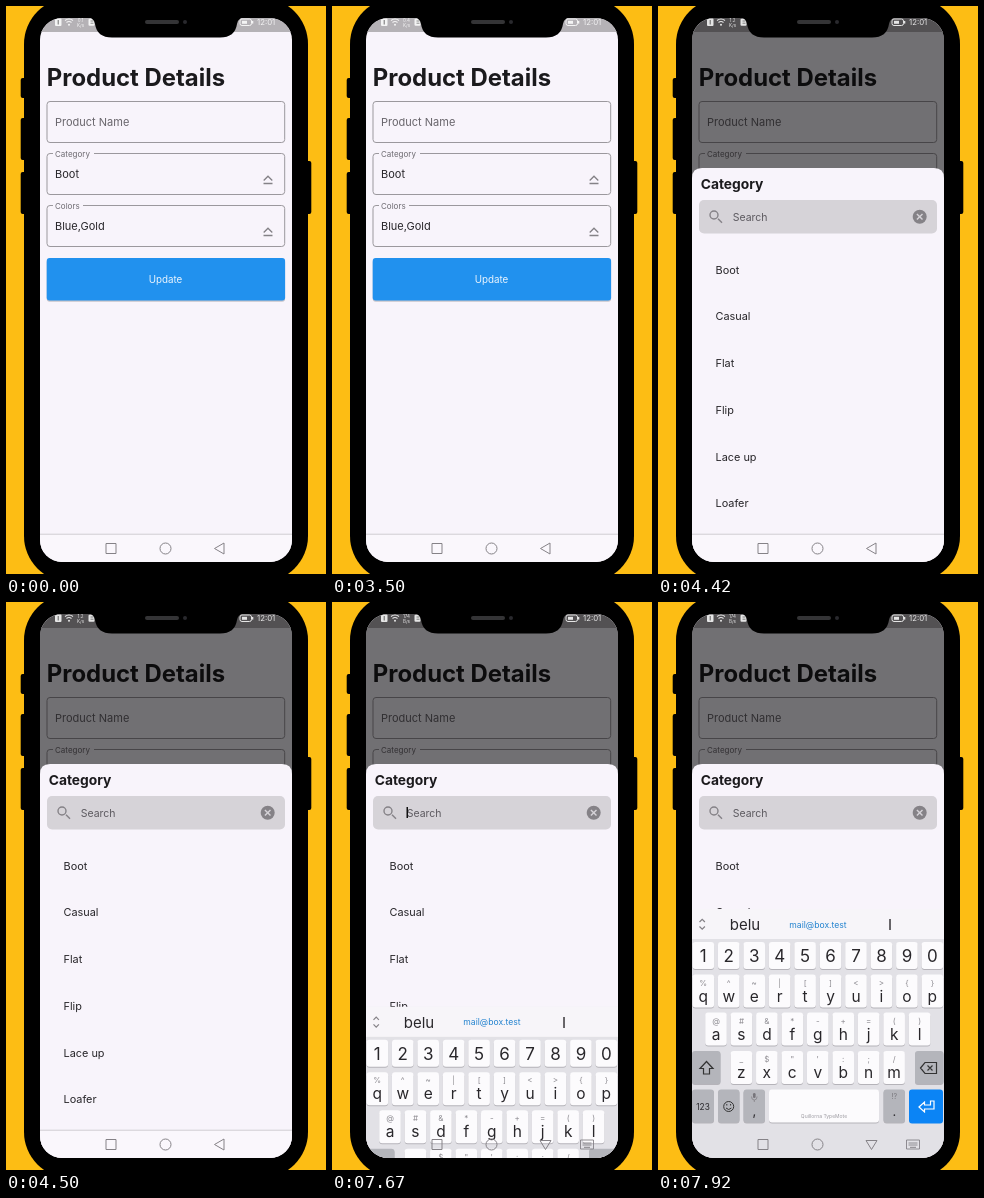
An HTML page for the animation above (8000 ms loop, 320 px wide and 568 px high).

```html
<!DOCTYPE html>
<html lang="en">
<head>
<meta charset="utf-8">
<title>Product form</title>
<style>
  html, body { margin: 0; height: 100%; overflow: hidden; background: #fdbd14; }
  svg { display: block; width: 100vw; height: 100vh; font-family: Inter, "Noto Sans", sans-serif; }
  .line { fill: none; stroke: #858287; }
  .mid { text-anchor: middle; }
</style>
</head>
<body>
<svg id="stage" viewBox="0 0 320 568"></svg>
<script>
const rect = (x, y, w, h, fill, r = 0, more = '') =>
  `<rect x="${x}" y="${y}" width="${w}" height="${h}" rx="${r}" fill="${fill}" ${more}/>`;
const text = (x, y, size, str, fill = '#29272b', more = '') =>
  `<text x="${x}" y="${y}" font-size="${size}" fill="${fill}" ${more}>${str.replace(/&/g, '&amp;').replace(/</g, '&lt;')}</text>`;
const mid = (x, y, size, str, fill) => text(x, y, size, str, fill, 'class="mid"');
const line = (d, more = '') => `<path class="line" d="${d}" ${more}/>`;

const paper = '#f8f4fb';

const outline = y => rect(41, y, 237.7, 41, 'none', 3, 'stroke="#9b989d"');

function field(y, label, gap, value) {
  return outline(y) + rect(47, y - 2, gap, 4, paper) +
    text(49, y + 3.5, 8, label, '#6d6a70') +
    text(49, y + 24.7, 11, value) +
    line(`M257.7 ${y + 27}l4.3 -4.3l4.3 4.3M257.5 ${y + 30}h9`, 'stroke-width="1.3"');
}

const page =
  rect(34, 12, 252, 544, paper) + rect(34, 12, 252, 14, '#b5b2b6') +
  text(40.8, 79.8, 23.9, 'Product Details', '#1b1a1d', 'font-weight="700"') +
  outline(95.5) +
  text(49, 120, 11, 'Product Name', '#69666c') +
  field(147.5, 'Category', 41, 'Boot') +
  field(199.5, 'Colors', 30, 'Blue,Gold') +
  rect(40.7, 253.5, 238.4, 42.3, '#000', 3, 'opacity=".2"') +
  rect(40.7, 252, 238.4, 42.6, '#2191ee', 3) +
  mid(159.5, 277, 9.8, 'Update', '#eaf4fd');

const status = '<g opacity=".85">' +
  rect(49, 12.5, 6.5, 7.5, '#fff', 1) + rect(51.6, 14, 1.3, 4.5, '#888') +
  '<path d="M59 14.5q4 -3 8 0M60.5 16.5q2.5 -2 5 0" fill="none" stroke="#fff" stroke-width="1.1"/><circle cx="63" cy="18.7" r="1" fill="#fff"/>' +
  '<text id="rate" class="mid" x="74.5" y="16" font-size="4.5" fill="#fff"></text>' +
  '<text id="unit" class="mid" x="74.5" y="21" font-size="4.5" fill="#fff"></text>' +
  rect(82.5, 12.8, 6, 7, '#fff', 1) + rect(84.5, 14.5, 3, 1, '#888') + rect(84.5, 16.7, 3, 1, '#888') +
  rect(234, 13, 11.5, 6.5, 'none', 2, 'stroke="#fff"') + rect(236, 14.8, 5, 3, '#fff') + rect(246, 15, 1.3, 2.6, '#fff') +
  text(251, 19.2, 7.8, '12:01', '#fff') + '</g>';

const items = ['Boot', 'Casual', 'Flat', 'Flip', 'Lace up', 'Loafer'];
const sheet =
  `<path d="M34 556V172q0 -10 10 -10h232q10 0 10 10v384z" fill="${paper}"/>` +
  text(42.7, 183, 13.8, 'Category', '#1b1a1d', 'font-weight="700"') +
  rect(41, 194, 238, 33.5, '#d6d3d8', 5) +
  line('M60 212.7l4 4', 'stroke-width="1.5"') + '<circle class="line" cx="56" cy="209" r="4" stroke-width="1.4"/>' +
  text(74.7, 214.6, 10.5, 'Search', '#5d5a60') +
  rect(74.5, 205, 1.5, 11, '#111', 0, 'id="caret"') +
  '<circle cx="261.7" cy="210.7" r="7" fill="#858287"/><path d="M258.9 207.9l5.6 5.6m0 -5.6l-5.6 5.6" stroke="#d6d3d8" stroke-width="1.4"/>' +
  items.map((s, i) => text(57.5, 267.7 + 46.7 * i, 10.9, s)).join('');

// Keyboard, drawn in its fully raised position
const grey = '#b4b5bb', pitch = 25.45;
const key = (x, y, w, h, fill = '#fcfbfd') =>
  rect(x, y + 1, w, h, '#b5b3b9', 3) + rect(x, y, w, h, fill, 3);
const keys = (letters, hints, x, y) => [...letters].map((c, i) => {
  const cx = x + pitch * i;
  return key(cx - 10.8, y, 21.6, 33) + mid(cx, y + 27, 15.5, c) + mid(cx, y + 11, 8, hints[i], '#8c8a90');
}).join('');

const keyboard =
  rect(34, 307, 252, 260, '#e2e1e6') + rect(34, 307, 252, 30, '#f7f5f9') +
  line('M41.5 320l2.7 -2.7l2.7 2.7M41.5 324.5l2.7 2.7l2.7 -2.7', 'stroke-width="1.2"') +
  mid(87, 328, 15, 'belu') + mid(160, 325.5, 8.6, 'mail@box.test', '#2383cf') + mid(232, 328, 15, 'I') +
  [...'1234567890'].map((c, i) =>
    key(45.3 + pitch * i - 10.8, 340, 21.6, 27) + mid(45.3 + pitch * i, 360.3, 17, c)).join('') +
  keys('qwertyuiop', '%^~|[]<>{}', 45.3, 372.5) +
  keys('asdfghjkl', '@#&*-+=()', 58, 410.5) +
  key(34, 449, 28.5, 33, grey) +
  line('M48.5 459.5l-6.5 7h3.5v5.5h6v-5.5h3.5z', 'style="stroke:#333" stroke-width="1.2"') +
  keys('zxcvbnm', '_$"\':;/', 83.4, 449) +
  key(257, 449, 28.5, 33, grey) +
  line('M262.5 466l4.5 -5.5h11.5v11h-11.5zM269.5 463.5l5 5m0 -5l-5 5', 'style="stroke:#333" stroke-width="1.2"') +
  key(34, 487.5, 22, 33, grey) + mid(45, 507.5, 8.3, '123') +
  key(60, 487.5, 21.5, 33, grey) +
  '<g fill="none" stroke="#333"><circle cx="70.7" cy="504.5" r="5"/><path d="M68 506q2.7 3 5.4 0M68.8 502v1.5M72.6 502v1.5"/></g>' +
  key(85.5, 487.5, 21.5, 33, grey) +
  rect(95, 491, 2.6, 5, '#77757b', 1.3) + line('M93.5 494.5q0 3.5 2.8 3.5t2.8 -3.5M96.3 498v2', 'stroke-width=".8"') +
  mid(96.3, 514, 13, ',') +
  key(111, 487.5, 110, 33) + mid(166, 515.5, 5, 'Quillorna TypeMote', '#9c9aa0') +
  key(225.5, 487.5, 21.5, 33, grey) + mid(236.3, 497, 7, '!?', '#77757b') + mid(236.3, 514, 13, '.') +
  rect(251, 487.5, 34, 34, '#0b84f5', 3) +
  '<path d="M261 505l5.5 -5v3h6v-4h3.5v8h-9.5v3z" fill="none" stroke="#fff" stroke-width="1.2"/>';

const nav =
  `<g id="navBar">${rect(34, 528, 252, 28, '#faf7fc')}${rect(34, 527.7, 252, 1, '#d0cdd2')}</g>`;
const navIcons =
  line('M100 537.5h10v10h-10z') + '<circle class="line" cx="159.5" cy="542.5" r="5.5"/>' +
  line('M208.5 542.5l9.5 -5.5v11z', 'id="back"') +
  `<g id="down">${line('M208 538.5h11l-5.5 9z')}${line('M248.5 538h13v9h-13zM250.5 541h9M250.5 543h9', 'stroke-width=".9"')}${line('M252 545.3h6')}</g>`;

const stage = document.getElementById('stage');
stage.innerHTML =
  '<clipPath id="screen"><rect x="34" y="12" width="252" height="544" rx="22"/></clipPath>' +
  rect(0, 0, 320, 568, '#fdbd14') +
  [[14.7, 72, 20], [14.7, 112, 42], [14.7, 166, 42], [295.3, 155, 53]].map(([x, y, h]) => rect(x, y, 10, h, '#000', 2)).join('') +
  rect(18, -8, 284, 584, '#000', 46) +
  `<g clip-path="url(#screen)">${page}
    <g id="sheet">${rect(34, 12, 252, 544, '#000', 0, 'opacity=".54"')}${sheet}</g>
    ${status}${nav}<g id="keyboard">${keyboard}</g>${navIcons}</g>
  <path d="M78 10q10 1 11 8q2 13.500 17 13.500h108q15 0 17 -13.500q1 -7 11 -8z"/>` +
  rect(139, 14, 34, 4, '#343436', 2) + '<circle cx="179" cy="16" r="2" fill="#29292d"/>';

const $ = id => document.getElementById(id);
const show = (id, on) => $(id).style.display = on ? '' : 'none';
const STEP = 1000 / 12;

function draw(now) {
  const t = now % 8000;
  const stepped = Math.floor(t / STEP) * STEP;   // motion runs at 12 steps a second
  const open = t >= 4418;
  const rise = Math.min(1, Math.max(0, (stepped - 7588) / 293));
  const eased = 1 - (1 - rise) ** 3;

  show('sheet', open);
  show('caret', t >= 7417 && t < 7917);
  show('keyboard', rise > 0);
  show('navBar', rise === 0);
  show('back', rise === 0);
  show('down', rise > 0);
  $('keyboard').setAttribute('transform', `translate(0 ${(250 * (1 - eased)).toFixed(2)})`);
  $('rate').textContent = t < 920 ? '0.1' : t < 3500 ? '372' : t < 4418 ? '0.4' : t < 6920 ? '1.2' : '174';
  $('unit').textContent = t >= 6920 || t >= 920 && t < 3500 ? 'B/s' : 'K/s';
}

function loop() {
  draw(performance.now());
  requestAnimationFrame(loop);
}
loop();
</script>
</body>
</html>
```
